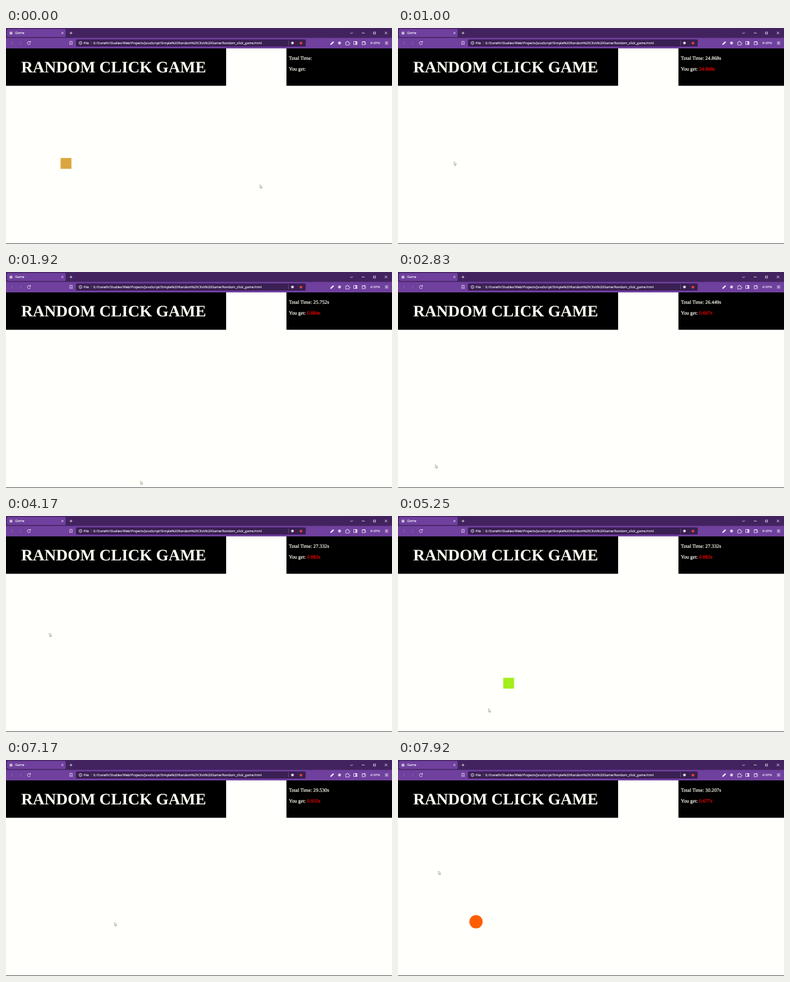
Animation of 640x360 px, one loop 8 s. Source, as an HTML page:

```html
<!DOCTYPE html>
<html lang="en">
<head>
<meta charset="utf-8">
<title>Random click game</title>
<style>
  html, body { margin: 0; width: 100%; height: 100%; overflow: hidden; background: #fffffc; }
  svg { display: block; width: 640px; height: 360px; }
  text { text-rendering: geometricPrecision; white-space: pre; fill: currentColor; }
  .ui { font: 5.56px "Open Sans", "Noto Sans", sans-serif; color: #fff; stroke: currentColor; stroke-width: .1; }
  .page { font-family: "Liberation Serif", "Times New Roman", serif; color: #fffff4; }
  .score { font-size: 8.33px; stroke: currentColor; stroke-width: .2; }
  .icon { fill: none; stroke: #f8f2fc; stroke-width: .8; }
</style>
</head>
<body>
<svg viewBox="0 0 640 360" xmlns="http://www.w3.org/2000/svg">
  <rect width="640" height="360" fill="#fffffc"/>

  <!-- browser window -->
  <rect width="640" height="17" fill="#42235f"/>
  <rect y="16.5" width="640" height="17.5" fill="#6f409e"/>
  <rect x="1.500" y="1.500" width="97.500" height="13.500" rx="2" fill="#6f409e"/>
  <circle cx="8.300" cy="8.500" r="2.500" fill="#c9bcd3"/>
  <text class="ui" x="15" y="10.300">Game</text>
  <g class="icon">
    <path d="M92 6.700l3.200 3.200m0-3.200l-3.200 3.200M105.500 8.400h4.600m-2.300-2.300v4.600"/>
    <path d="M571 7.500l2 2 2-2M590 8.400h4.500M609.300 6.800h3.300v3.300h-3.300zM628 6.300l4 4m0-4l-4 4"/>
    <path d="M11.500 22.500l-2.500 2.500 2.500 2.500M23 22.500l2.500 2.500-2.500 2.500" opacity=".28"/>
    <path d="M40.200 23.600A2.600 2.600 0 1 0 40.500 26M40.600 21.800v2.200h-2.200"/>
    <path d="M105.900 22.300h3.800v5.400l-1.900-1.500-1.900 1.500z"/>
  </g>
  <rect x="116" y="19" width="381" height="12" rx="2" fill="#3a1f52"/>
  <g class="icon">
    <circle cx="123.500" cy="25" r="2.500"/>
    <path d="M123.500 24.700v1.700M123.500 23.300v.6"/>
    <path d="M141.300 22v6M468.500 21v8" opacity=".25"/>
    <path d="M538 27.800l.6-1.700 3.700-3.700 1.200 1.200-3.700 3.700z" fill="#f8f2fc"/>
    <circle cx="553" cy="25" r="1.500"/>
    <path d="M553 22v6m-3-3h6m-5.100-2.100l4.200 4.200m0-4.200l-4.200 4.200" stroke-width=".6"/>
    <path d="M563.300 23.500h1.800q-.2-1.600 1-1.600t1 1.600h1.600v1.600q1.500-.1 1.500 1t-1.500 1v1.200h-5.400z"/>
    <path d="M576.500 22.500h5.500v5h-5.500z"/>
    <path d="M580.600 22.500v5" stroke-width="2"/>
    <path d="M590.500 23.300h5.500v4.500h-5.500zM590.500 23.300l4.500-1v1M594 25.500h2"/>
    <circle cx="606" cy="25" r="1.300"/>
    <path d="M628.500 23.200h5m-5 1.800h5m-5 1.800h5"/>
  </g>
  <text class="ui" x="128.500" y="27">File</text>
  <text class="ui" x="145" y="27">E:/Daneth/Studies/Web/Projects/JavaScript/Simple%20Random%20Click%20Game/Random_click_game.html</text>
  <circle cx="475" cy="25" r="2.300" fill="#d9d2df"/>
  <circle cx="489" cy="25.300" r="2.200" fill="#e0402b"/>
  <text class="ui" x="609" y="27">VPN</text>

  <!-- page -->
  <rect y="34" width="365" height="62.300"/>
  <rect x="465" y="34" width="175" height="62.300"/>
  <text class="page" x="25.200" y="74" font-size="26.670" font-weight="700">RANDOM CLICK GAME</text>
  <text class="page score" x="469" y="53.300">Total Time: <tspan id="total"></tspan></text>
  <text class="page score" x="469" y="70.900">You get: <tspan id="get" color="#f00"></tspan></text>
  <rect id="shape"/>
  <rect y="359" width="640" height="1" fill="#555"/>
  <path id="cursor" d="M0 0V5.700L1.300 4.500 2.200 6.500 3.100 6.100 2.200 4.200H4Z"
        fill="#fff" stroke="#77774a" stroke-width=".55"/>
</svg>

<script>
const LOOP = 8000, STEP = 1000 / 12;
const $ = id => document.getElementById(id);

// When a shape appears (ms), how long until it is hit, where, its size;
// "via" is a stop of the pointer on its way there
const rounds = [
  { on: 0,    wait: 830,  x: 93,  y: 223, size: 18 },
  { on: 1030, wait: 884,  x: 223, y: 348, size: 23 },
  { on: 2050, wait: 697,  x: 62,  y: 321, size: 27 },
  { on: 3190, wait: 883,  x: 72,  y: 195, size: 26, via: [37, 192] },
  { on: 4650, wait: 1263, x: 177, y: 276, size: 18, via: [150, 321] },
  { on: 6070, wait: 935,  x: 180, y: 270.5, size: 4 },
  { on: 7236, wait: 677,  x: 67,  y: 185, size: 30 },
  { on: 7913, wait: 9000, x: 121.4, y: 266.3, size: 22 }
];
const BEFORE = 24.038; // seconds already on the clock when the loop begins

const ease = p => p * p * (3 - 2 * p);
const clamp = p => Math.min(1, Math.max(0, p));

function glide(a, b, p) {
  const e = ease(clamp(p));
  return a.map((v, i) => v + (b[i] - v) * e);
}

// The pointer sets off when a shape appears and rests once it is there
function pointer(t) {
  let pos = [421, 261];
  for (const r of rounds) {
    const p = (t - r.on) / r.wait;
    if (p < 0) break;
    if (r.via) pos = glide(pos, r.via, p / .42);
    pos = glide(pos, [r.x, r.y], r.via ? (p - .72) / .24 : (p - .08) / .82);
  }
  return pos;
}

function setAttrs(el, attrs) {
  for (const k in attrs) el.setAttribute(k, attrs[k]);
}

// Squares and circles take turns; the hue moves on by a fixed angle
function drawShape(t) {
  const i = rounds.findIndex(r => t >= r.on && t < r.on + r.wait);
  $("shape").style.display = i < 0 ? "none" : "";
  if (i < 0) return;
  const { x, y, size } = rounds[i];
  setAttrs($("shape"), {
    x: x - size * .14, y: y - size * .35, width: size, height: size,
    rx: i % 2 ? size / 2 : 0,
    fill: `hsl(${40 + 100.3 * i} ${68 + 4.5 * i}% ${55 - .7 * i}%)`
  });
}

function drawScore(t) {
  const times = rounds.filter(r => t >= r.on + r.wait).map(r => r.wait / 1000);
  if (times.length) times[0] += BEFORE;
  const total = times.reduce((a, b) => a + b, 0);
  const show = s => times.length ? s.toFixed(3) + "s" : "";
  $("total").textContent = show(total);
  $("get").textContent = show(times[times.length - 1]);
}

function draw(t) {
  drawShape(t);
  drawScore(t);
  $("cursor").setAttribute("transform", `translate(${pointer(t)})`);
}

const start = performance.now();
function tick(now) {
  const t = Math.max(0, now - start) % LOOP;
  draw(Math.floor((t + 4) / STEP) * STEP % LOOP);
  requestAnimationFrame(tick);
}
draw(0);
requestAnimationFrame(tick);
</script>
</body>
</html>
```
